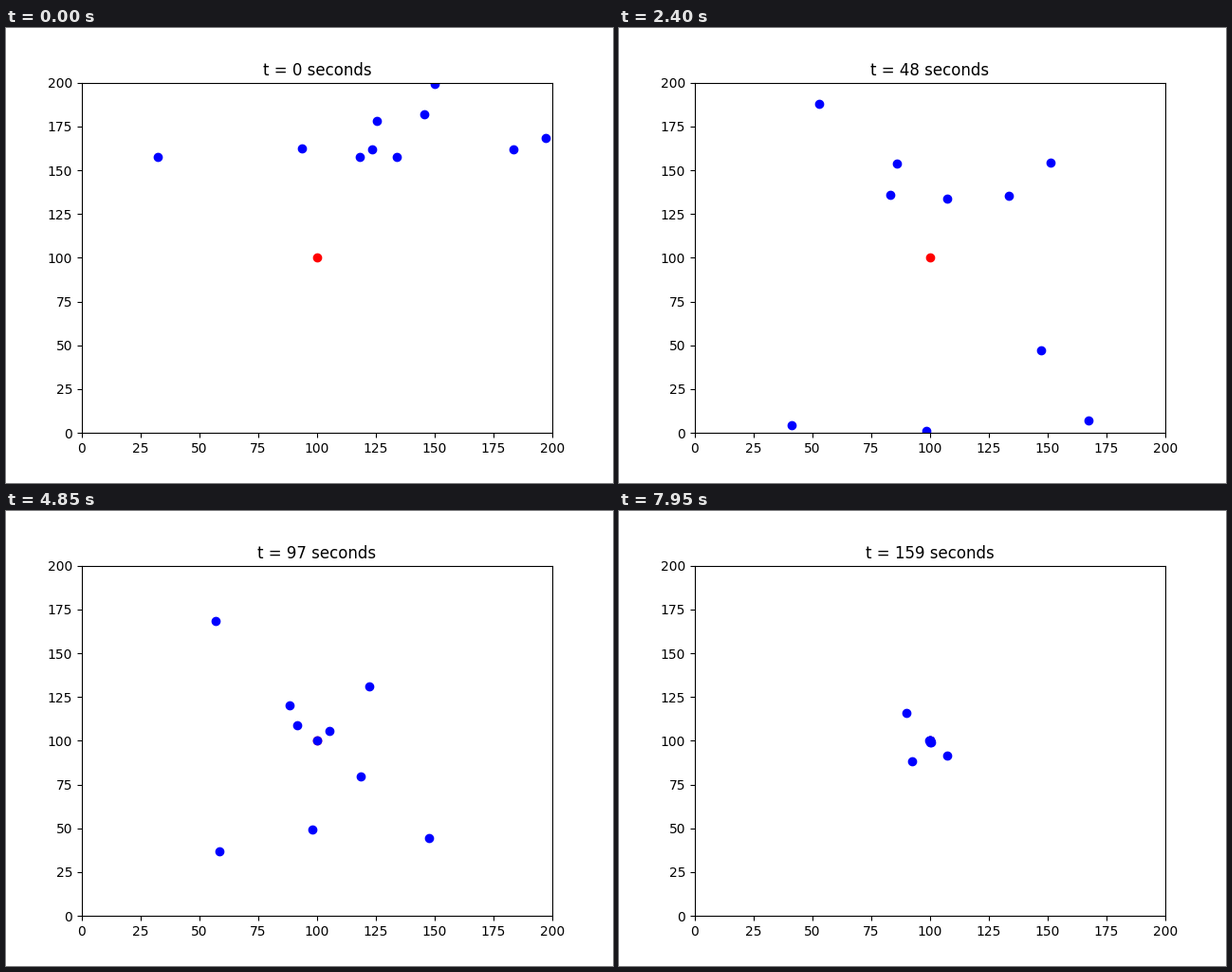
These frames come from a looping animation (640 by 480 pixels, 8 s). A matplotlib script:

```python
import numpy as np
import matplotlib.pyplot as plt
from matplotlib.animation import FuncAnimation

SIZE = 200
FRAMES = 160
TURN, HOMING = 58, 64   # times at which the dots change course
GOAL = np.array([100.0, 100.0])

# Each dot: start x, start y, first heading and second heading in degrees
DOTS = np.array([
    (32.4, 157.4, 79.3, 243), (93.5, 162.7, 148.3, 149),
    (118.1, 157.6, 114.1, 69), (123.4, 161.9, 212.7, 155),
    (125.4, 178.1, 247.8, 279), (133.9, 157.6, 184.5, 227),
    (145.6, 181.9, 255.4, 130), (150.0, 199.2, 93.3, 196),
    (183.5, 161.9, 109.8, 30), (197.2, 168.4, 196.8, 91)])


def unit(degrees):
    a = np.radians(degrees)
    return np.column_stack((np.cos(a), np.sin(a)))


def roam(t):
    """Unit speed along the first heading, then the second; edges wrap."""
    first, second = min(t, TURN), max(t - TURN, 0)
    path = DOTS[:, :2] + first * unit(DOTS[:, 2]) + second * unit(DOTS[:, 3])
    return path % SIZE


def home_in(n):
    """Unit steps straight to the goal, then hopping back and forth over it."""
    offset = roam(HOMING) - GOAL
    dist = np.hypot(*offset.T)
    extra = np.maximum(n - np.floor(dist), 0)
    left = np.where(extra > 0, dist % 1 - extra % 2, dist - n)
    return GOAL + offset * (left / dist)[:, None]


fig, ax = plt.subplots(figsize=(6.4, 4.8), dpi=100)
ax.set_xlim(0, SIZE)
ax.set_ylim(0, SIZE)
ax.plot(*GOAL, "ro")
dots, = ax.plot([], [], "bo")
title = ax.set_title("", pad=5.4)


def update(t):
    points = roam(t) if t < HOMING else home_in(t - HOMING)
    dots.set_data(*points.T)
    title.set_text(f"t = {t} seconds")
    return dots, title


anim = FuncAnimation(fig, update, frames=FRAMES, interval=50,
                     repeat=True, repeat_delay=0, blit=False)
plt.show()
```
